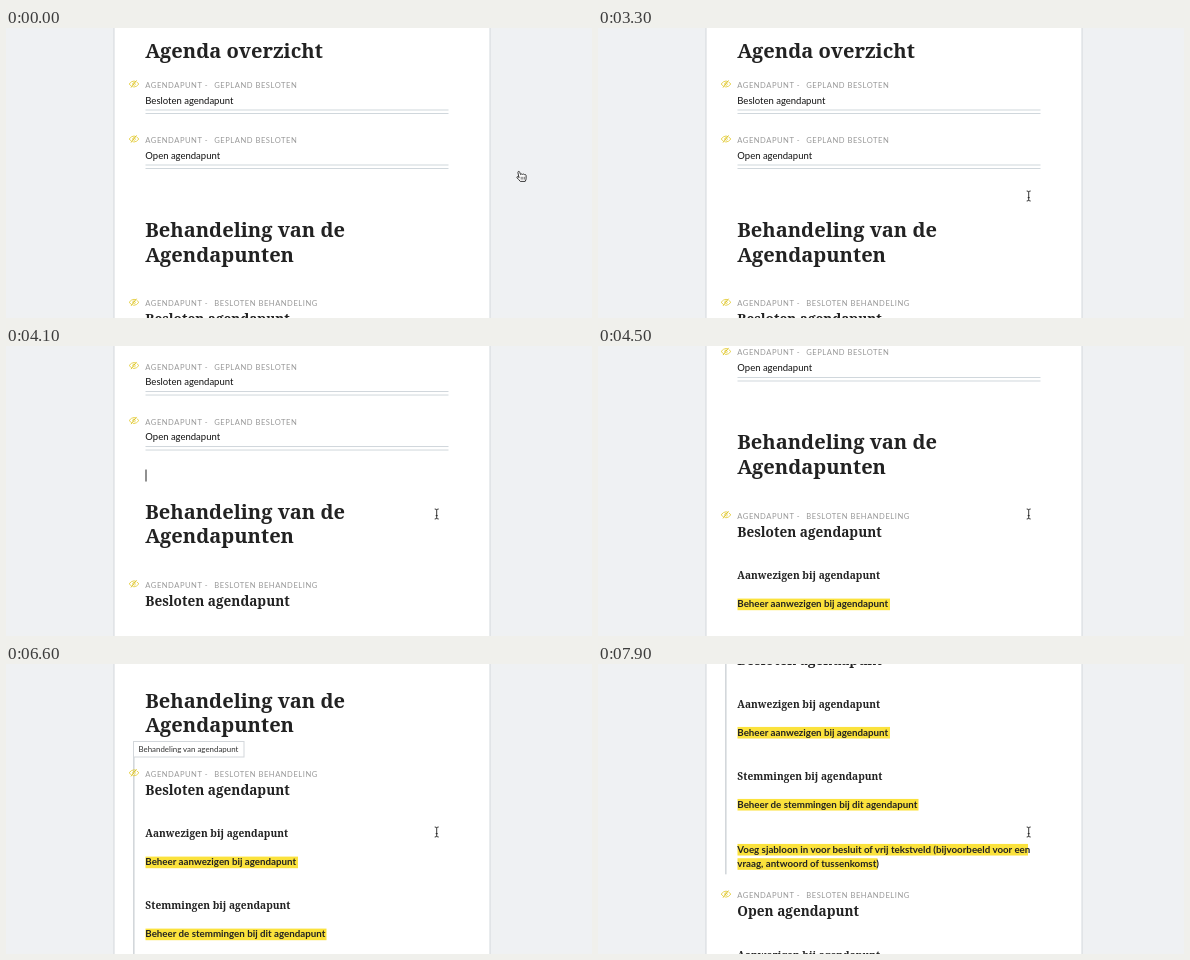
These frames come from a looping animation (586x290 px, 8 s). An HTML page:

```html
<!DOCTYPE html>
<html lang="nl">
<head>
<meta charset="utf-8">
<title>Agenda</title>
<style>
  html, body { margin: 0; width: 100%; height: 100%; overflow: hidden; background: #eff1f3; }
  svg { display: block; }
  text { font-family: Lato, sans-serif; fill: #222; white-space: pre; }
  .h1, .h2, .h3 { font-family: "Noto Serif", serif; font-weight: 700; }
  .h1 { font-size: 20.1px; }
  .h2 { font-size: 13.6px; }
  .h3 { font-size: 10.2px; }
  .body { font-size: 9.5px; fill: #111; }
  .mark { font-size: 9.75px; font-weight: 700; }
  .label { font-size: 7.6px; letter-spacing: .52px; fill: #999; }
  .tip { font-size: 7.9px; fill: #333; }
</style>
</head>
<body>
<svg width="586" height="290" viewBox="0 0 586 290">
  <rect x="108" y="-2" width="376" height="294" fill="#fff" stroke="#d3d8dc"/>
  <g id="doc"></g>
  <g id="hand" fill="#fff" stroke="#222" stroke-width=".9" stroke-linejoin="round" stroke-linecap="round">
    <path d="M-2.6 1.2L-3.6-3.4q0-1.2.9-1.2.7 0 1 1L-.9-1.4q1.2-1.2 2-.2 1.3-.8 1.9.2 1.4-.4 1.6 1V2.2q0 1.6-.9 3.2H-1.2Q-2.6 3.6-4.5 1.8q-.3-1.1.6-1.2.7.1 1.3.6z"/>
    <path d="M-.3 1.2V3.2M1.3 1.2V3.2M2.9 1.2V3.2" stroke-width=".6"/>
  </g>
  <path id="beam" d="M-2-5Q0-5 0-4Q0-5 2-5M0-4V4M-2 5Q0 5 0 4Q0 5 2 5M-1 1.6H1"
    fill="none" stroke="#222" stroke-width=".9"/>
</svg>
<script>
const $ = id => document.getElementById(id);
const text = (kind, y, str, x = 139.3) => `<text class="${kind}" x="${x}" y="${y}">${str}</text>`;
const rect = (x, y, w, h, fill) => `<rect x="${x}" y="${y}" width="${w}" height="${h}" fill="${fill}"/>`;
const mark = (y, w, str) => rect(139.5, y - 8.8, w, 11.6, '#fbe23c') + text('mark', y, str);

const eye = y => `<g transform="translate(128 ${y})" fill="none" stroke="#e3ca2a" stroke-width=".8">
  <path d="M-4.9 0Q0-6 4.9 0Q0 6-4.9 0Z"/><circle r="1.3"/>
  <path d="M-2.2 3.8L3.2-3.2" stroke="#fff"/><path d="M-3 3.6L2.6-3.6" stroke="#d8bd10"/></g>`;

const label = (y, str) => eye(y - 4) + text('label', y, 'AGENDAPUNT -') + text('label', y, str, 208.3);

const agendaItem = (y, title) => label(y, 'GEPLAND BESLOTEN') + text('body', y + 15.6, title)
  + rect(139.5, y + 21.5, 303, 1, '#d0d7dc') + rect(139.5, y + 25, 303, 1, '#d0d7dc');

const treatment = (y, title) => label(y, 'BESLOTEN BEHANDELING')
  + text('h2', y + 17.8, title)
  + text('h3', y + 60.6, 'Aanwezigen bij agendapunt')
  + mark(y + 88.6, 152.5, 'Beheer aanwezigen bij agendapunt')
  + text('h3', y + 132.4, 'Stemmingen bij agendapunt')
  + mark(y + 160.6, 181, 'Beheer de stemmingen bij dit agendapunt')
  + mark(y + 205.6, 290.5, 'Voeg sjabloon in voor besluit of vrij tekstveld (bijvoorbeeld voor een')
  + mark(y + 219.9, 140, 'vraag, antwoord of tussenkomst)');

$('doc').innerHTML = text('h1', 29.5, 'Agenda overzicht')
  + agendaItem(60, 'Besloten agendapunt') + agendaItem(115, 'Open agendapunt')
  + text('h1', 209, 'Behandeling van de') + text('h1', 233.5, 'Agendapunten')
  + '<rect id="caret" x="139.5" y="160" width="1" height="12" fill="#222"/>'
  + '<g id="hover">' + rect(127, 258, 1.6, 247.5, '#d3d7db')
  + '<rect x="127.5" y="243" width="110.5" height="15.5" fill="#fff" stroke="#d3d7db"/>'
  + text('tip', 253.6, 'Behandeling van agendapunt', 132.5) + '</g>'
  + treatment(278.3, 'Besloten agendapunt') + treatment(529.3, 'Open agendapunt');

// Linear interpolation through [time, value] pairs
function track(t, keys) {
  const i = keys.findIndex(k => k[0] > t);
  if (i === 0) return keys[0][1];
  if (i < 0) return keys[keys.length - 1][1];
  const [t0, a] = keys[i - 1], [t1, b] = keys[i];
  return a + (b - a) * (t - t0) / (t1 - t0);
}

const scrollKeys = [[3500, 0], [3800, 10], [4100, 36.3], [4400, 88], [4700, 140], [5000, 165.5],
  [7100, 165.5], [7300, 177], [7600, 223.2], [7900, 295], [8000, 312]];
const xKeys = [[500, 515.5], [1100, 544], [1200, 544], [1500, 430.7]];
const yKeys = [[500, 148], [1100, 17], [1200, 17], [1500, 168]];

function draw(now) {
  const t = now % 8000;
  const at = `translate(${track(t, xKeys)} ${track(t, yKeys)})`;
  const onPage = t >= 1400;
  $('doc').setAttribute('transform', `translate(0 ${-track(t, scrollKeys)})`);
  $('hand').setAttribute('transform', at);
  $('beam').setAttribute('transform', at);
  $('hand').setAttribute('opacity', onPage ? 0 : 1);
  $('beam').setAttribute('opacity', onPage ? 1 : 0);
  $('caret').setAttribute('opacity', t >= 1800 && Math.floor((t - 1800) / 500) % 2 === 0 ? 1 : 0);
  $('hover').setAttribute('transform', `translate(${track(t, [[4800, -4], [5100, -1.2], [5300, 0]])} 0)`);
  $('hover').setAttribute('opacity', track(t, [[4800, 0], [5100, .9], [5300, 1]]));
  requestAnimationFrame(draw);
}
requestAnimationFrame(draw);
</script>
</body>
</html>
```
